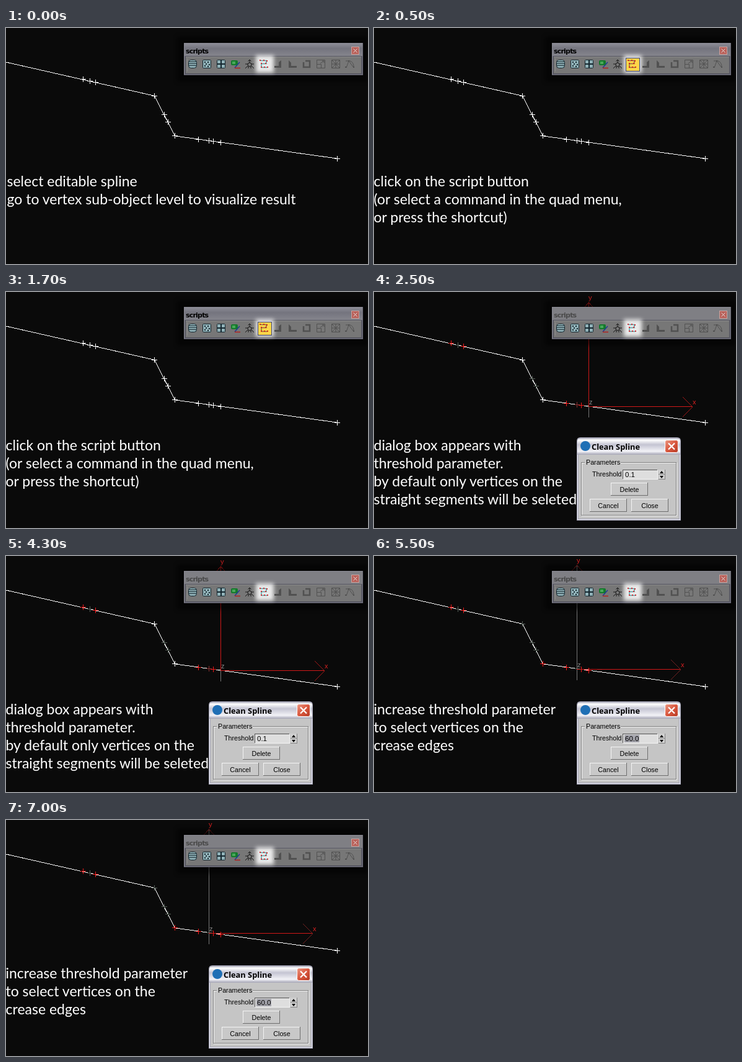
An HTML page that plays this animation: 584 by 380 pixels, repeating every 8000 ms.

```html
<!DOCTYPE html>
<html lang="en">
<head>
<meta charset="utf-8">
<title>Clean Spline</title>
<style>
  html, body { margin: 0; width: 100%; height: 100%; overflow: hidden; background: #0a0a0a; }
  svg { display: block; }
  .crisp { shape-rendering: crispEdges; }
  .line { fill: none; stroke-width: 1; }
  .caption { font: 23px Lato, sans-serif; fill: #fff; }
  .ui { font: 10.7px "Liberation Sans", Arial, sans-serif; fill: #000; }
  .axis { font: 11px "Liberation Sans", Arial, sans-serif; }
  .bar { font: bold 11px "DejaVu Sans", sans-serif; letter-spacing: -.8px; }
  .title { font: bold 12.8px "Open Sans", sans-serif; fill: #000; }
</style>
</head>
<body>
<svg id="stage" width="584" height="380" viewBox="0 0 584 380">
  <defs>
    <filter id="soft" x="-50%" y="-50%" width="200%" height="200%"><feGaussianBlur stdDeviation="3"/></filter>
    <linearGradient id="active" x2="0" y2="1">
      <stop stop-color="#8c8c96"/><stop offset=".4" stop-color="#74747e"/><stop offset="1" stop-color="#85858d"/>
    </linearGradient>
    <linearGradient id="silver" x2="0" y2="1">
      <stop stop-color="#a8a8b8"/><stop offset=".12" stop-color="#fff"/><stop offset=".4" stop-color="#c4c4d2"/>
      <stop offset=".8" stop-color="#f2f2f7"/><stop offset="1" stop-color="#a4a4b4"/>
    </linearGradient>
    <linearGradient id="red" x2="1" y2="1">
      <stop stop-color="#eb9a86"/><stop offset=".5" stop-color="#d9583f"/><stop offset="1" stop-color="#b63a24"/>
    </linearGradient>
  </defs>

  <g id="scene"></g>

  <g id="toolbar">
    <rect x="276" y="14" width="308" height="72" fill="#000" opacity=".5" filter="url(#soft)"/>
    <g class="crisp">
      <rect x="287" y="24" width="289" height="52" fill="#686874"/>
      <path class="line" stroke="#8a8a94" d="M287.5 75V24.5H575"/>
      <rect x="289" y="26" width="285" height="48" fill="#777"/>
      <rect data-on="01" x="288" y="25" width="287" height="20" fill="url(#active)"/>
      <rect data-on="23" x="288" y="25" width="287" height="20" fill="#7f7f84"/>
      <path class="line" stroke="#51515c" d="M289.5 45.500H573.500V73.500H289.500z"/>
      <path class="line" stroke="#8b8b8b" d="M290 46.5H573M292.5 49V70"/>
    </g>
    <text data-on="01" class="bar" x="290" y="41">scripts</text>
    <text data-on="23" class="bar" x="290" y="41" fill="#4a4a4a">scripts</text>
    <rect x="557.5" y="30.500" width="12" height="12" fill="#b9615a" stroke="#c9a4a0"/>
    <path class="line" stroke="#e6dcda" stroke-width="1.500" d="M560.5 33.500l6 6m0-6l-6 6"/>
    <rect x="403" y="44" width="29" height="28" fill="#fff" opacity=".85" filter="url(#soft)"/>
    <rect data-on="1" class="crisp" x="406.5" y="48.500" width="22" height="21" fill="#ffd648" stroke="#3c4478"/>
    <g id="icons"></g>
  </g>

  <g data-on="23">
    <path fill="#a2a2b4" d="M327 368V240q0-6 6-6H489q6 0 6 6V368z"/>
    <path fill="url(#silver)" d="M328 262V241q0-6 6-6H488q6 0 6 6V262z"/>
    <path class="line" stroke="#ececf2" d="M328.500 262V366.500H493.500V262"/>
    <rect class="crisp" x="330" y="262" width="162" height="103" fill="#c5c5c5"/>
    <circle cx="341" cy="248" r="8" fill="#1f6fb5"/>
    <text class="title" x="351" y="254">Clean Spline</text>
    <rect x="469.500" y="238.500" width="21" height="20" rx="3" fill="url(#red)" stroke="#fff"/>
    <path class="line" stroke="#fff" style="stroke-width:2.200" d="M475 243.500l10 10m0-10l-10 10"/>
    <g class="crisp line">
      <path stroke="#f4f4f4" d="M340 275.500H335.500V360.500H488.500V275.500H398"/>
      <path stroke="#7c7c7c" d="M340 274.500H334.500V359.500H487.500V274.500H398"/>
    </g>
    <text class="ui" x="342" y="278">Parameters</text>
    <text class="ui" x="399.500" y="297" text-anchor="end">Threshold</text>
    <g class="crisp">
      <rect x="401" y="286" width="57" height="16" fill="#dedede"/>
      <path class="line" stroke="#555" d="M401.500 301V286.500H457"/>
      <path class="line" stroke="#f4f4f4" d="M402 301.500H457.500V287"/>
      <rect data-on="3" x="404" y="288" width="24" height="12" fill="#a4a4ac"/>
      <rect x="459" y="286" width="10" height="16" fill="#d0d0d0"/>
      <path class="line" stroke="#858585" d="M459 293.500H469M459 301.500H469.500V286"/>
    </g>
    <path d="M461 292l3-4 3 4zM461 296l3 4 3-4z"/>
    <text data-on="2" class="ui" x="405" y="298" style="font-size:11.500px">0.1</text>
    <text data-on="3" class="ui" x="405" y="298" style="font-size:11.500px">60.0</text>
    <g id="buttons"></g>
  </g>

  <g id="captions" class="caption"></g>
</svg>
<script>
const add = (id, markup) => document.getElementById(id).insertAdjacentHTML('beforeend', markup);
const path = (d, stroke, on = '0123') =>
  `<path class="crisp line" data-on="${on}" stroke="${stroke}" d="${d}"/>`;

// Spline and its vertices; each vertex has a colour for the two selection states.
const RED = '#f01818', DIM = '#566058', WHITE = '#fff';
const vertices = [
  [124, 82, RED, RED], [135, 85, DIM, DIM], [144, 87, RED, RED],
  [239, 109, WHITE, DIM], [255, 139, DIM, DIM], [261, 151, DIM, DIM],
  [272, 173, WHITE, RED], [310, 179, RED, RED], [327, 181, '#8a3030', DIM],
  [334, 182, RED, RED], [346, 184, DIM, RED], [534, 210, WHITE, WHITE]
];
add('scene', path('M0 55L239.500 109.300L272.500 173.800L534.500 210.200', WHITE));
for (const [x, y, low, high] of vertices) {
  const cross = `M${x - 4} ${y + .5}h9M${x + .5} ${y - 4}v9`;
  add('scene', path(cross, WHITE, '01') + path(cross, low, '2') + path(cross, high, '3'));
}

function gizmo(x, y, on, vertical, head) {
  const label = (dx, dy, name, fill) =>
    `<text class="axis" data-on="${on}" x="${x + dx}" y="${y + dy}" fill="${fill}">${name}</text>`;
  add('scene',
    path(`M${x + .5} ${y}v17`, '#777', on) +
    path(`M${x + .5} ${y}v-168`, vertical, on) +
    path(`M${x} ${y - .5}h168`, '#d01818', on) +
    path(`M${x + 152} ${y - 16}l16 16l-16 16M${x - 8} ${y - 159}l8.500 -9l8.500 9`, head, on) +
    label(0, -172, 'y', '#d82020') + label(168, -4, 'x', '#d82020') + label(1, -4, 'z', '#8a8a8a'));
}
gizmo(346, 185, '2', '#d01818', '#a01818');
gizmo(327, 183, '3', '#777', '#702020');

// Toolbar icons, each drawn around its own centre.
const dot = (x, y, fill, size = 2) => `<rect x="${x}" y="${y}" width="${size}" height="${size}" fill="${fill}"/>`;
const stroke = (d, color, width = 1) => `<path d="${d}" fill="none" stroke="${color}" stroke-width="${width}"/>`;
const tile = fill => `<rect x="-6.500" y="-6.500" width="13" height="13" rx="1" fill="${fill}" stroke="#14262e"/>`;
const GREY = '#515151', PALE = '#8fb0b6', INK = '#14262e';
const splineIcon = (line, knot, on) => `<g data-on="${on}">` +
  stroke('M-6 -5.500H4V-.5H-4V5.500H6', line, 1.500) +
  [[-7, -7], [-1, -7], [4, -6], [-5, -2], [2, -2], [-5, 4], [0, 4], [5, 4]].map(([x, y]) => dot(x, y, knot)).join('') + '</g>';
const icons = [
  `<rect x="-6.500" y="-6.500" width="13" height="13" rx="4" fill="${PALE}" stroke="${INK}"/>` +
    stroke('M-6 -3.500H6M-6 -.5H6M-6 2.500H6', INK),
  tile(PALE) + [[-4, -4], [1, -4], [-2, -1], [3, 0], [-4, 2], [1, 3]].map(([x, y]) => dot(x, y, INK)).join(''),
  tile(PALE) + stroke('M0 -6V6M-6 0H6', INK, 2),
  '<rect x="-7" y="-6" width="11" height="8" rx="2" fill="#147a2c"/><rect x="-5" y="-4" width="5" height="4" fill="#49a85a"/>' +
    stroke('M-1 6L7 -3', '#1d3f90', 1.500) + stroke('M-1 6.500H8', '#b02020', 1.500),
  stroke('M0 -7V-2M-2.500 -4.500L0 -7L2.500 -4.500M-7 0H-3M3 0H7M-3 3L-7 7M3 3L7 7M-2 4V7M2 4V7', '#161616') +
    '<circle r="3" cy="1" fill="#777" stroke="#161616"/>',
  splineIcon('#55a4a8', '#d03038', '023') + splineIcon('#8c6a48', '#d02818', '1'),
  `<path d="M5 -6V6H-6V3H1V-3z" fill="${GREY}"/>`,
  `<path d="M-6 -6V6H7V3H-2V-2z" fill="${GREY}"/>`,
  stroke('M-5 -3V5H5V-5H-2', GREY, 2.500),
  stroke('M-6.500 -6.500H6.500V6.500H-6.500zM-6.500 .5H.5V6.500M-1 -1L5 -5M2 -5H5V-2', GREY),
  stroke('M-6.500 -6.500H6.500V6.500H-6.500zM0 -6V6M-6 0H6M-6 -6L6 6M6 -6L-6 6', GREY),
  stroke('M-6 6L-2 -5L6 6M-7 -5H0Q6 -3 6 5', GREY) + dot(-3, -6, GREY) + dot(-8, 4, GREY) + dot(5, 4, GREY)
];
icons.forEach((icon, i) => add('icons', `<g transform="translate(${Math.round(301 + i * 23.050)} 58)">${icon}</g>`));

for (const [x, y, name] of [[382, 307, 'Delete'], [348, 333, 'Cancel'], [415, 333, 'Close']]) {
  add('buttons', `<rect class="crisp" x="${x}" y="${y}" width="60" height="21" fill="#c8c8c8"/>` +
    path(`M${x + .5} ${y + 20}V${y + .5}H${x + 59}`, '#f4f4f4') +
    path(`M${x} ${y + 20.5}H${x + 59.5}V${y}`, '#6e6e6e') +
    `<text class="ui" x="${x + 30}" y="${y + 14.5}" text-anchor="middle">${name}</text>`);
}

const captions = [
  ['select editable spline', 'go to vertex sub-object level to visualize result'],
  ['click on the script button', '(or select a command in the quad menu,', 'or press the shortcut)'],
  ['dialog box appears with', 'threshold parameter.', 'by default only vertices on the', 'straight segments will be seleted'],
  ['increase threshold parameter', 'to select vertices on the', 'crease edges']
];
captions.forEach((lines, step) => lines.forEach((line, i) =>
  add('captions', `<text data-on="${step}" x="${step ? -.5 : 1.5}" y="${254.500 + 29 * i}">${line}</text>`)));

const starts = [0, 500, 2500, 5500], LOOP = 8000;
const parts = document.querySelectorAll('[data-on]');
let shown = -1;
function draw(now) {
  const time = now % LOOP;
  const step = starts.filter(start => start <= time).length - 1;
  if (step !== shown) {
    shown = step;
    for (const part of parts) part.style.display = part.dataset.on.includes(step) ? '' : 'none';
  }
}
const origin = performance.now();
function tick() {
  draw(performance.now() - origin);
  requestAnimationFrame(tick);
}
tick();
</script>
</body>
</html>
```
